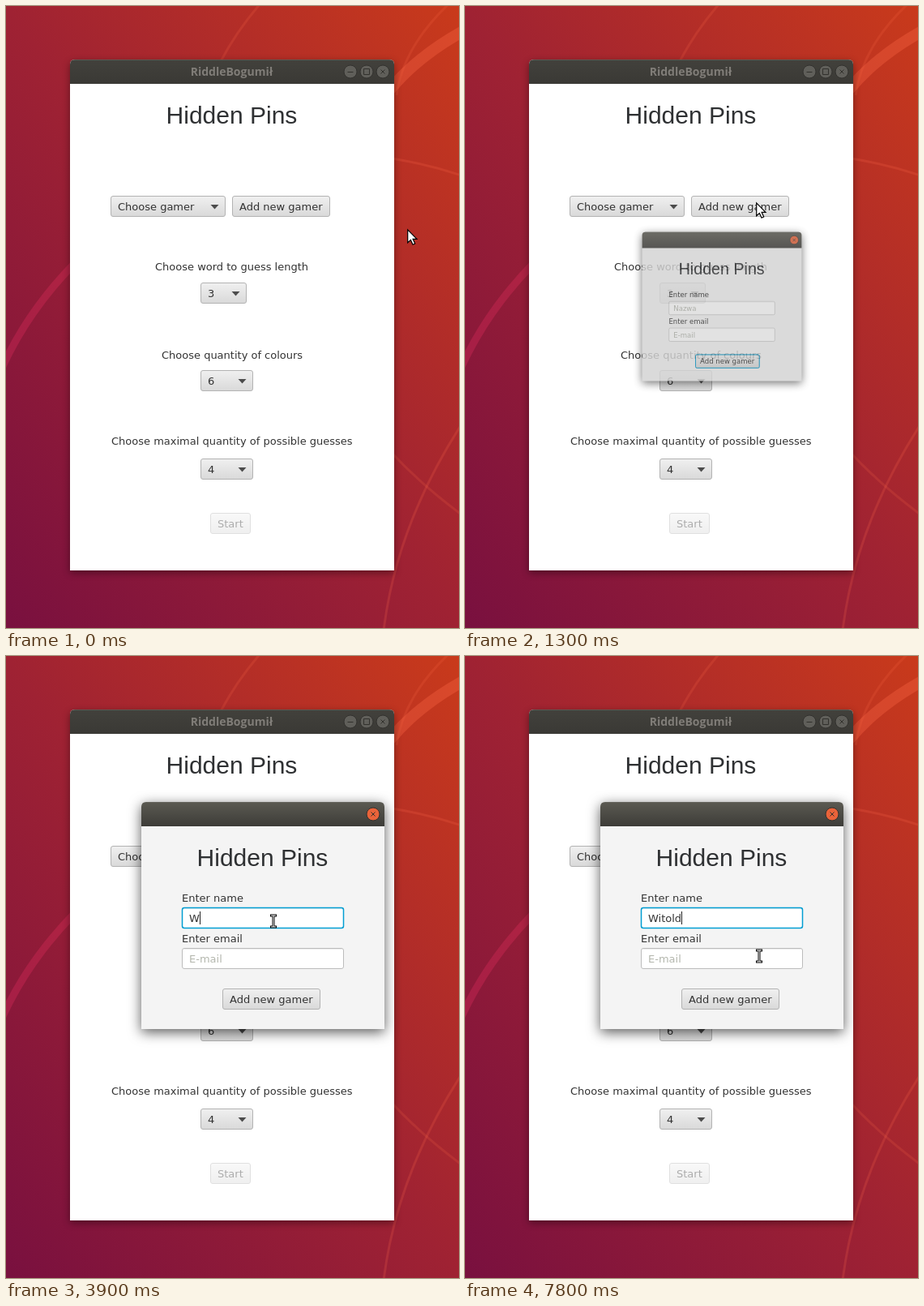
These frames come from a looping animation (559x767 px, 8 s). An HTML page:

```html
<!DOCTYPE html>
<html lang="en">
<head>
<meta charset="utf-8">
<title>Game setup</title>
<style>
html, body { margin: 0; width: 100%; height: 100%; overflow: hidden; background: #9b2135; }
svg { display: block; width: 559px; height: 767px;
  background: linear-gradient(to top right, #79103f, #9f2233 50%, #c93a1b); }
text { font: 13px "DejaVu Sans", sans-serif; fill: #333; white-space: pre; }
.head { font: 30px "Liberation Sans", Arial, sans-serif; text-anchor: middle; fill: #2f3133; }
.title { font: bold 14px "Open Sans", sans-serif; text-anchor: middle; fill: #807d78; }
.active .title { fill: #dfdbd2; }
.hint { fill: #b4b7ae; }
.bar { fill: url(#barDim); }
.active .bar { fill: url(#barLit); }
.shade { filter: drop-shadow(0 3px 5px rgba(0,0,0,.4)); }
.active .shade { filter: drop-shadow(0 4px 8px rgba(0,0,0,.65)); }
.knob { fill: #605f5a; stroke: #33322f; }
.active .knob { fill: #77766f; }
.active .close { fill: #e9633a; }
.icon { fill: none; stroke: #32312d; }
.btn { fill: url(#btn); stroke: #b3b3b3; }
.field { fill: #fff; stroke: #bcbcbc; }
.glow { fill: none; stroke: #039ed3; stroke-opacity: 0; stroke-width: 1.5; }
.focus .glow { stroke-opacity: 1; }
.focus.down .btn { fill: url(#btnDown); }
.wall { fill: none; stroke: #ff6a4a; }
#dialog { transform-origin: 317px 467px; }
</style>
</head>
<body>
<script>
const START = performance.now();
const NAME = "Witold";
const KEYS = [3900, 4500, 5300, 5400, 6100, 6500];
const CARET = [[2800, 3300], [3700, 4400], [4500, 5000], [5300, 5900], [6100, 7000], [7500, 8000]];
// Pointer stops: time, x, y
const STOPS = [
  [0, 495, 275], [100, 491, 274], [200, 477, 270], [300, 456, 265], [400, 430, 258],
  [500, 402, 251], [600, 379, 246], [700, 364, 243], [800, 359, 242],
  [1900, 354, 253], [2000, 341, 286], [2100, 328, 322], [2200, 326, 335],
  [2500, 327, 334], [2600, 328, 332], [2700, 329, 329], [3000, 330, 327],
  [7300, 340, 335], [7400, 366, 365], [7500, 361, 361], [7700, 367, 371], [7800, 363, 370]
];

const gradient = (id, top, bottom) =>
  `<linearGradient id="${id}" x2="0" y2="1"><stop stop-color="${top}"/><stop offset="1" stop-color="${bottom}"/></linearGradient>`;
const text = (x, y, s, cls = "") => `<text x="${x}" y="${y}" class="${cls}">${s}</text>`;
const box = (x, y, w, h, cls) =>
  `<rect x="${x + .5}" y="${y + .5}" width="${w - 1}" height="${h - 1}" rx="2.5" class="${cls}"/>`;
const glow = (x, y, w, h) => box(x, y, w, h, "glow");
const button = (x, y, w, label, id = "") =>
  `<g id="${id}">${box(x, y, w, 26, "btn")}${glow(x, y, w, 26)}${text(x + 9, y + 18, label)}</g>`;
const combo = (x, y, w, label) => button(x, y, w, label) +
  `<path d="M${x + w - 18.5} ${y + 11}h10l-5 5.5z" fill="#4c4c4c"/>`;
const field = (y, hint, id) =>
  `<g id="${id}">${box(217, y, 200, 26, "field")}<path d="M219 ${y + 1.5}h196" stroke="#ececec"/>` +
  `${glow(217, y, 200, 26)}${text(226, y + 18, hint, "hint")}</g>`;
const knob = (x, y, icon, cls = "") =>
  `<circle cx="${x}" cy="${y}" r="8" class="knob ${cls}"/><path class="icon" d="M${x} ${y}${icon}"/>`;
const CROSS = "m-2.5 -2.5l5 5m0 -5l-5 5";
const frame = (x, y, w, h, fill) => {
  const top = `M${x} ${y + 30}v-24q0 -6 6 -6h${w - 12}q6 0 6 6v24`;
  return `<path class="shade" d="${top}v${h - 30}h${-w}z" fill="${fill}"/><path class="bar" d="${top}z"/>` +
    `<path d="M${x + 5} ${y + .5}h${w - 10}" stroke="#6b6962" opacity=".6"/>`;
};
const wall = (d, width, opacity, color = "#ff6a4a") =>
  `<path class="wall" d="${d}" stroke-width="${width}" opacity="${opacity}" style="stroke:${color}"/>`;

document.body.innerHTML = `<svg viewBox="0 0 559 767">
<defs>
  ${gradient("barDim", "#42413c", "#3a3935")}${gradient("barLit", "#5b5a52", "#3d3c38")}
  ${gradient("btn", "#f0f0f0", "#d9d9d9")}${gradient("btnDown", "#dcdcdc", "#c9c9c9")}
</defs>
${wall("M-4 444Q28 375 84 318", 9, .3, "#e83060")}
${wall("M474 103Q508 62 564 31", 14, .32)}
${wall("M264 70Q285 30 314 -3", 3, .18)}
${wall("M482 110Q490 50 548 -4", 3, .17)}
${wall("M476 188Q520 195 562 209", 3, .2)}
${wall("M466 770Q482 640 562 516", 3, .2)}
${wall("M476 551Q512 590 562 627", 3, .17)}
<g id="main">
  ${frame(79, 66, 400, 630, "#fff")}
  ${text(278.5, 86, "RiddleBogumił", "title")}
  ${knob(425, 81, "m-3.5 .5h7")}${knob(445, 81, "m-3.5 -3.5h7v7h-7z")}${knob(465, 81, CROSS, "close")}
  ${text(278.5, 145, "Hidden Pins", "head")}
  ${combo(129, 234, 142, "Choose gamer")}
  ${button(279, 234, 121, "Add new gamer", "opener")}
  ${text(184, 326, "Choose word to guess length")}${combo(240, 341, 57, "3")}
  ${text(192, 435, "Choose quantity of colours")}${combo(240, 449, 65, "6")}
  ${text(130, 541, "Choose maximal quantity of possible guesses")}${combo(240, 558, 65, "4")}
  <g opacity=".4">${button(252, 625, 50, "Start")}</g>
</g>
<g id="dialog" class="active">
  ${frame(167, 180, 300, 280, "#f4f4f4")}
  ${knob(453, 195, CROSS, "close")}
  ${text(316.5, 259, "Hidden Pins", "head")}
  ${text(217, 303, "Enter name")}${field(310, "Nazwa", "nameField")}
  ${text(217, 353, "Enter email")}${field(360, "E-mail", "mailField")}
  ${button(267, 410, 121, "Add new gamer", "adder")}
  <text id="typed" x="226" y="328"></text>
  <rect id="caret" y="315" width="1" height="16" fill="#222"/>
</g>
<path id="arrow" d="M.7 .9V16.8L4.4 13.4L7 19.2L9.7 18L7.1 12.3H12z" fill="#fff" stroke="#000" stroke-width="1.2"/>
<g id="beam" fill="none">
  <path d="M-4 -7H4M-4 7H4M0 -7V7" stroke="#000" stroke-width="3"/>
  <path d="M-3 -7H3M-3 7H3M0 -7V7" stroke="#fff"/>
</g>
</svg>`;

const $ = id => document.getElementById(id);
const show = (el, on) => el.setAttribute("visibility", on ? "inherit" : "hidden");

function drawPointer(t) {
  const [, x, y] = STOPS.findLast(stop => stop[0] <= t);
  const overField = t >= 1500 && x > 217 && x < 417 && (y >= 310 && y < 336 || y >= 360 && y < 386);
  show($("arrow"), !overField);
  show($("beam"), overField);
  $(overField ? "beam" : "arrow").setAttribute("transform", `translate(${x} ${y})`);
}

function drawDialog(t) {
  const dialog = $("dialog");
  const [scale, opacity, light] = t < 1400 ? [.656, .83, .865] : t < 1500 ? [.93, .97, .97] : [1, 1, 1];
  show(dialog, t >= 1300);
  dialog.style.transform = scale < 1 ? `scale(${scale})` : "none";
  dialog.style.opacity = opacity;
  dialog.style.filter = light < 1 ? `brightness(${light})` : "none";

  const editing = t >= 2800;
  $("adder").setAttribute("class", editing ? "" : "focus");
  $("nameField").setAttribute("class", editing ? "focus" : "");
  show($("nameField").querySelector("text"), !editing);

  const count = KEYS.filter(key => key <= t).length;
  $("typed").textContent = NAME.slice(0, count);
  const width = count ? $("typed").getComputedTextLength() : 0;
  $("caret").setAttribute("x", 226 + Math.round(width));
  show($("caret"), CARET.some(([on, off]) => t >= on && t < off));
}

function draw(now) {
  const t = Math.max(0, now - START) % 8000;
  const pressed = t >= 1100 && t < 1300;
  $("main").setAttribute("class", pressed ? "active" : "");
  $("opener").setAttribute("class", pressed ? "focus down" : "");
  drawDialog(t);
  drawPointer(t);
  requestAnimationFrame(draw);
}
draw(START);
</script>
</body>
</html>
```
